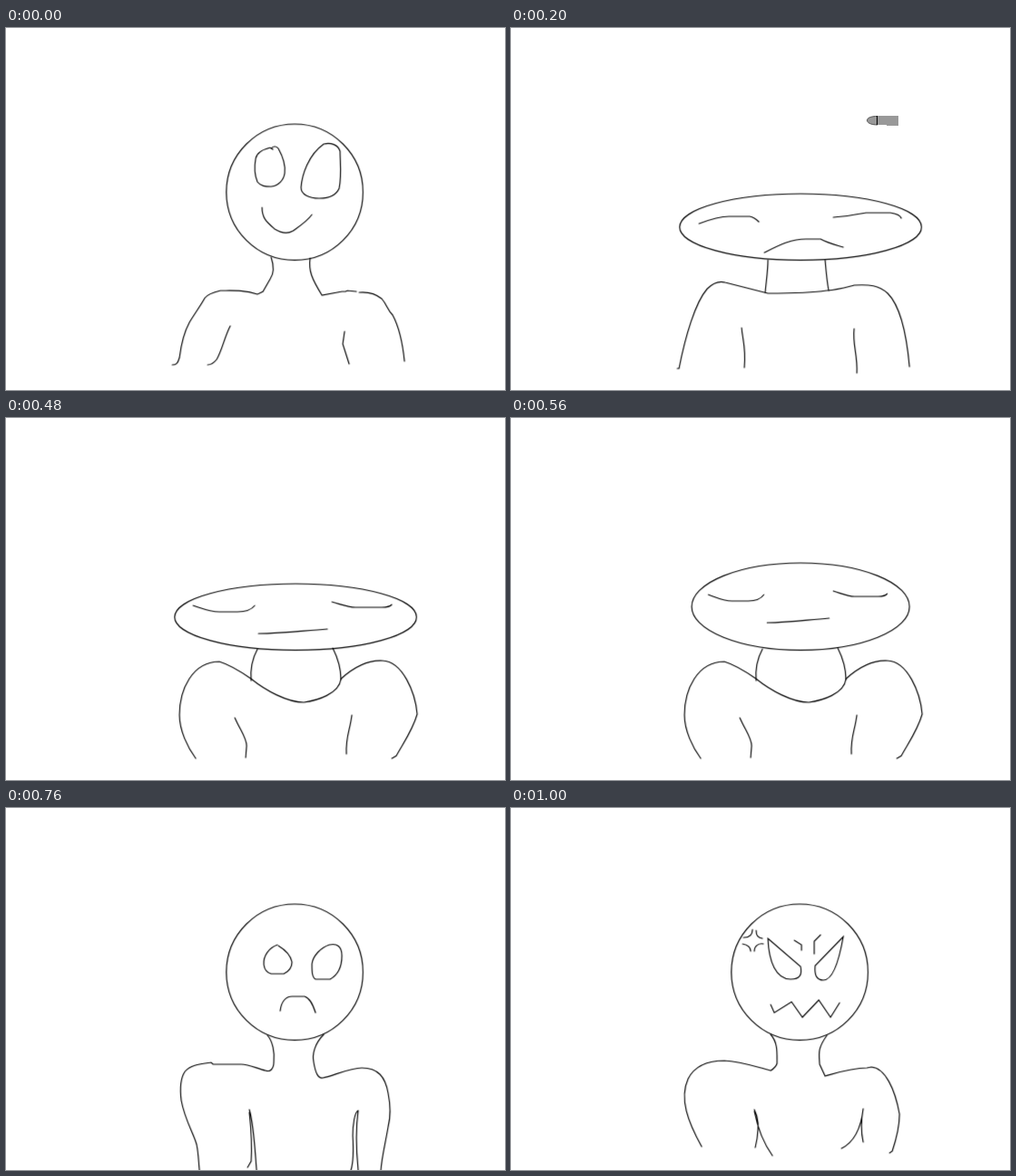
Animation, 550 px wide and 400 px high, one loop 1200 ms. Source, as an HTML page:

```html
<!DOCTYPE html>
<html lang="en">
<head>
<meta charset="utf-8">
<title>Dodge</title>
<style>
html, body { margin: 0; width: 100%; height: 100%; overflow: hidden; background: #fff; }
svg { display: block; width: 550px; height: 400px; }
.ink { fill: none; stroke: #000; stroke-width: 1.15; stroke-linecap: round; }
.ink * { vector-effect: non-scaling-stroke; }
.face { transform-origin: 319px 256px; }

/* Everything shares one 1200 ms clock and changes in hard steps. */
.pose, .face, #head, #bullet { animation: 1.2s step-end infinite; }
.pose, .face, #bullet { opacity: 0; }

#bodyRest  { animation-name: bodyRest; }
#bodyDuck  { animation-name: duck; }
#bodyLow   { animation-name: low; }
#bodyTall  { animation-name: tall; }
#bodySad   { animation-name: bodySad; }
#bodyAngry { animation-name: bodyAngry; }
#faceRest  { animation-name: bodyRest, squashRest; }
#faceDuck  { animation-name: duck, squashDuck; }
#faceLow   { animation-name: low, liftLow; }
#faceTall  { animation-name: tall, stretch; }
#faceSad   { animation-name: faceSad; }
#faceAngry { animation-name: faceAngry; }
#rage      { animation-name: rage; }
#head      { animation-name: head; }
#bullet    { animation-name: shot, fly; }

@keyframes bodyRest  { 0% { opacity: 1 } 13.333%, 100% { opacity: 0 } }
@keyframes duck      { 13.333% { opacity: 1 } 40%, 100% { opacity: 0 } }
@keyframes low       { 40% { opacity: 1 } 53.333%, 100% { opacity: 0 } }
@keyframes tall      { 53.333% { opacity: 1 } 63.333%, 100% { opacity: 0 } }
@keyframes bodySad   { 63.333% { opacity: 1 } 70%, 100% { opacity: 0 } }
@keyframes bodyAngry { 70%, 100% { opacity: 1 } }
@keyframes faceSad   { 63.333% { opacity: 1 } 76.666%, 100% { opacity: 0 } }
@keyframes faceAngry { 76.666%, 100% { opacity: 1 } }
@keyframes rage      { 83.333%, 100% { opacity: 1 } }
@keyframes shot      { 10% { opacity: 1 } 40%, 100% { opacity: 0 } }

@keyframes squashRest { 0% { transform: none } 10%, 100% { transform: scale(1.26, .83) } }
@keyframes squashDuck { 0% { transform: scale(.855, 1.35) } 16.666%, 100% { transform: none } }
@keyframes liftLow    { 0% { transform: none } 46.666%, 100% { transform: translateY(-12px) scaleX(.9) } }
@keyframes stretch {
  0% { transform: scale(.81, 1.15) }
  56.666% { transform: none }
  60%, 100% { transform: scale(1.16, .88) }
}

@keyframes head {
  0%      { cx: 318px; cy: 181.2px; rx: 75.3px;  ry: 75.2px }
  10%     { cx: 318px; cy: 194px;   rx: 94.5px;  ry: 62.4px }
  13.333% { cx: 319px; cy: 206.9px; rx: 113.9px; ry: 49.5px }
  16.666% { cx: 319px; cy: 219.7px; rx: 133.3px; ry: 36.7px }
  46.666% { cx: 319px; cy: 208.2px; rx: 120px;   ry: 48.2px }
  53.333% { cx: 319px; cy: 146.7px; rx: 48px;    ry: 109.7px }
  56.666% { cx: 319px; cy: 160.7px; rx: 59.2px;  ry: 95.7px }
  60%     { cx: 318px; cy: 172.2px; rx: 69px;    ry: 84.2px }
  63.333%, 100% { cx: 318px; cy: 181.2px; rx: 75.3px; ry: 75.2px }
}

/* Slight acceleration from right to left */
@keyframes fly {
  0%      { transform: translateX(514px) }
  13.333% { transform: translateX(453px) }
  16.666% { transform: translateX(392px) }
  20%     { transform: translateX(329px) }
  23.333% { transform: translateX(266px) }
  26.666% { transform: translateX(201px) }
  30%     { transform: translateX(135px) }
  33.333% { transform: translateX(69px) }
  36.666%, 100% { transform: translateX(1px) }
}
</style>
</head>
<body>
<svg viewBox="0 0 550 400">
  <g id="bullet">
    <path d="M12 97.5C4 97.5 .5 99.5 .5 102C.5 104.5 4 107 12 107Z" fill="#999" stroke="#555"/>
    <path d="M12 97H35V108H22V107H12Z" fill="#999"/>
    <path d="M11.5 97V107" stroke="#000"/>
  </g>

  <g class="ink" transform="translate(.2 .2)">
    <ellipse id="head" cx="318" cy="181" rx="75" ry="75"/>

    <g class="pose" id="bodyRest">
      <path d="M292 253C295 262 296 270 291 277L283 291L277 294C262 289 250 290 236 290C228 292 222 294 219 298C214 307 206 318 202 325C196 336 193 348 191 364C189 371 187 372 183 372"/>
      <path d="M335 254C333 268 337 277 348 295L370 291H374L376 290L386 291M389 292C400 291 408 294 414 299C420 306 420 311 426 317C434 332 437 348 439 368"/>
      <path d="M247 329C241 340 238 356 232 366C228 371 225 372 222 372M373 335L371 349L378 371"/>
    </g>
    <g class="face" id="faceRest">
      <path d="M294 134L291 132C283 134 276 138 275 144C273 155 274 163 277 170C281 175 286 175 292 175C300 174 306 168 307 160C308 152 305 142 300 133C298 130 294 130 292 133"/>
      <path d="M350 128C358 126 366 129 368 136C368 148 370 162 367 177C363 186 354 188 345 188C334 188 325 184 325 176C326 162 333 140 350 128Z"/>
      <path d="M282 198C282 210 287 214 296 222C304 227 311 227 316 224C323 219 331 214 337 206"/>
    </g>

    <g class="pose" id="bodyDuck">
      <path d="M283 256C283 268 281 280 280 292M346 256C347 268 348 280 350 290"/>
      <path d="M183 376H185C192 340 203 303 216 288C223 281 229 279 236 281L283 293C305 293 328 293 347 290C360 289 370 286 378 284C395 283 405 284 415 293C430 308 436 340 439 374"/>
      <path d="M254 331C255 345 259 352 257 375M378 332C376 350 382 360 381 381"/>
    </g>
    <g class="face" id="faceDuck">
      <path d="M207 216C220 211 230 208 240 208H263C268 209 271 212 273 214"/>
      <path d="M355 209C370 208 380 206 391 204H418C425 205 429 207 430 210"/>
      <path d="M279 248C295 240 308 233 325 233H341C348 237 356 239 366 242"/>
    </g>

    <g class="pose" id="bodyLow">
      <path d="M277 255C271 266 269 278 270 290M360 254C366 266 369 277 369 289"/>
      <path d="M209 376C200 364 191 345 191 328C191 300 205 269 235 269C248 273 260 281 270 288C286 301 310 314 328 314C342 312 367 305 369 288C380 278 397 267 415 268C437 269 451 303 453 327C448 345 437 360 430 373L425 376"/>
      <path d="M252 331C258 345 265 353 265 362L264 375M381 328C379 345 374 352 375 371"/>
    </g>
    <g class="face" id="faceLow">
      <path d="M206 207C218 211 225 214 235 214H255C263 214 270 212 274 207"/>
      <path d="M359 203C370 206 377 209 385 209H414C420 209 424 207 425 206"/>
      <path d="M278 238C305 238 325 235 354 233"/>
    </g>

    <g class="pose" id="bodyTall">
      <path d="M294 249C292 275 290 300 288 321M342 250C340 275 336 300 336 321"/>
      <path d="M227 400C223 365 233 310 247 287C254 276 264 275 270 282C276 292 280 310 290 321C294 323 297 324 304 324H328C338 323 344 315 349 305C357 294 370 282 382 279C390 285 402 311 412 332C416 355 420 375 423 397"/>
      <path d="M263 336C271 340 269 350 269 362C272 378 274 390 270 400M376 340C376 360 379 380 382 400"/>
    </g>
    <g class="face" id="faceTall">
      <path d="M296 103C305 100 316 99 317 109C318 120 316 140 308 152C304 157 295 156 290 153C283 149 284 143 285 138C286 125 292 110 302 106"/>
      <path d="M351 106C340 108 334 125 334 137C334 145 334 151 337 155H350C357 154 361 150 362 140C364 125 361 108 355 106Z"/>
      <path d="M304 207L303 205C303 192 318 181 329 180C335 180 338 184 338 190C339 200 338 208 336 214C333 212 332 209 331 206L329 202C322 201 314 202 312 206L306 214H303Z"/>
    </g>

    <g class="pose" id="bodySad">
      <path d="M288 251C294 258 296 270 295 280C295 288 291 292 286 290C277 288 268 283 259 283H228L226 281C212 283 203 284 197 291C191 300 192 315 193 323C197 345 207 360 210 372C212 382 212 390 213 400"/>
      <path d="M350 250C340 260 337 272 339 281C341 293 344 299 349 298C360 296 378 287 392 287C410 287 418 297 421 315C424 330 424 340 421 352C418 370 414 385 413 400"/>
      <path d="M268 333C273 350 274 375 276 400M268 336C270 355 271 375 270 390L266 397"/>
      <path d="M388 334C384 336 382 350 382 362C383 378 383 390 380 400M388 334C385 355 386 380 388 400"/>
    </g>
    <g class="face" id="faceSad">
      <path d="M299 151C290 154 283 163 284 173C285 180 288 182 292 183H306C312 180 315 176 315 170C313 160 305 155 300 152"/>
      <path d="M356 151C365 149 370 153 370 163C370 175 366 184 357 189H341C337 187 337 180 337 172C338 163 347 154 356 151Z"/>
      <path d="M302 224C303 214 308 208 315 208H329C335 210 338 217 341 226"/>
    </g>

    <g class="pose" id="bodyAngry">
      <path d="M286 250C294 259 293 270 293 282C292 286 289 288 286 290C270 286 255 280 235 279C215 279 202 285 195 299C185 321 195 347 210 374"/>
      <path d="M348 251C338 265 339 270 340 283L346 296C360 292 375 287 392 287L397 286C412 287 423 310 428 338C428 352 424 367 420 379L417 381"/>
      <path d="M268 333C274 345 272 355 271 365L269 375M268 335C272 355 278 370 288 384"/>
      <path d="M388 332C385 348 386 360 388 369M388 332C386 350 380 368 364 376"/>
    </g>
    <g class="face" id="faceAngry">
      <path d="M283 144L319 175C321 184 318 189 308 189C292 189 284 170 283 144Z"/>
      <path d="M366 142L335 174C334 185 337 190 344 190C355 190 362 165 366 142Z"/>
      <path d="M286 217L290 226L309 214L321 231L339 212L352 231L362 215"/>
    </g>
    <g class="face" id="rage">
      <path d="M312 146L320 151V157M341 140L334 147V161"/>
      <path d="M256 143C262 143 266 140 266 134M270 135C270 141 272 143 277 144M255 150C260 151 264 153 264 158M268 158C268 152 273 149 278 150"/>
    </g>
  </g>
</svg>
</body>
</html>
```
